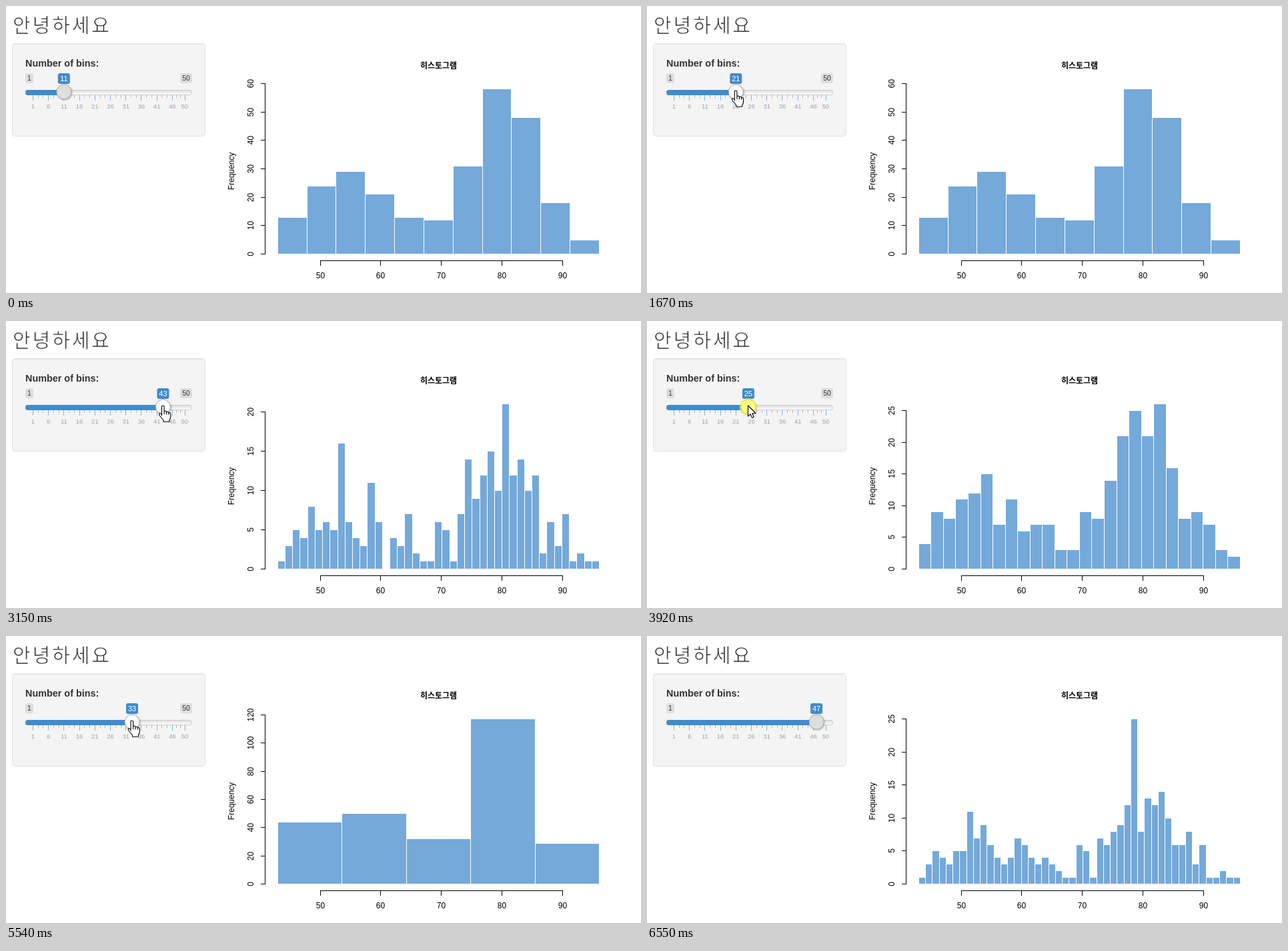
Animation of 952 by 431 pixels, one loop 7.33 s. Source, as an HTML page:

```html
<!DOCTYPE html>
<html lang="ko">
<meta charset="utf-8">
<title>Histogram slider</title>
<style>
  html, body { margin: 0; width: 100%; height: 100%; overflow: hidden; background: #fff; }
  svg { display: block; font-family: "Liberation Sans", Arial, sans-serif; }
  .ko { font-family: "Noto Sans CJK KR", "Noto Sans CJK", sans-serif; }
  .mid { text-anchor: middle; }
  .crisp { shape-rendering: crispEdges; }
</style>
<svg width="952" height="431" viewBox="0 0 952 431">
  <defs>
    <linearGradient id="groove" x2="0" y2="1">
      <stop stop-color="#dcdcdc"/><stop offset="1" stop-color="#fff"/>
    </linearGradient>
    <filter id="soft" x="-50%" y="-50%" width="200%" height="200%">
      <feDropShadow dx="1" dy="1" stdDeviation="1.2" flood-opacity=".3"/>
    </filter>
  </defs>
  <text class="ko" x="10" y="40" font-size="29" font-weight="300" letter-spacing=".1em" fill="#333" stroke="#fff" stroke-width=".7">안녕하세요</text>
  <rect x="9.5" y="56.5" width="289" height="139" rx="4" fill="#f4f4f4" stroke="#e1e1e1"/>
  <path d="M12 57.5H296" stroke="#e9e9e9"/>
  <text x="29" y="91" font-size="14.4" font-weight="bold" fill="#333">Number of bins:</text>
  <rect x="29.5" y="126.5" width="249" height="7" rx="3.5" fill="url(#groove)" stroke="#ccc"/>
  <g id="scale"></g>
  <g id="slider"></g>
  <text class="ko mid" x="648.5" y="94" font-size="12" font-weight="bold">히스토그램</text>
  <text class="mid" transform="translate(342 248) rotate(-90)" font-size="12">Frequency</text>
  <g id="plot"></g>
  <g id="pointer"></g>
</svg>
<script>
const TICK = 77.2, LOOP = 7330, REDRAW_DELAY = 3, FIRST = 43, SPAN = 53;

// How often each value from FIRST on was observed; every chart is binned from this
const counts = [1,0,3,5,4,3,5,5,6,5,7,9,6,4,3,4,7,6,0,4,3,4,3,2,1,1,2,
                4,5,1,7,6,8,9,12,15,10,8,13,12,14,10,6,6,2,6,3,6,1,1,2,1,0,1];

// Each drag: first tick, last tick, value reached
const drags = [[12, 20, 21], [21, 29, 32], [34, 38, 43], [43, 47, 26],
               [49, 57, 16], [58, 64, 5], [66, 72, 33], [75, 79, 47]];

const $ = id => document.getElementById(id);
const mix = (a, b, p) => a + (b - a) * p;
const text = (x, y, s, size, fill = "#000", more = "") =>
  `<text class="mid" x="${x}" y="${y}" font-size="${size}" fill="${fill}" ${more}>${s}</text>`;
const line = (d, color = "#000") => `<path class="crisp" d="${d}" fill="none" stroke="${color}"/>`;
const tag = (x, y, w, h, fill) => `<rect x="${x}" y="${y}" width="${w}" height="${h}" rx="3" fill="${fill}"/>`;

const sliderX = v => 40.4 + 4.645 * (v - 1);
const plotX = v => Math.round(406.84 + 9.096 * (v - FIRST)) + .5;

function stateAt(k) {
  const state = { value: 11, bins: 11, down: false, left: false };
  for (const [from, to, target] of drags) {
    if (k < from) break;
    state.down = k < to;
    state.left = state.down && target < 20 && target < state.value;
    state.value = mix(state.value, target, Math.min(1, (k - from) / (to - from)) ** 1.6);
    if (k >= to + REDRAW_DELAY) state.bins = target;
    else if (k >= to) break;
  }
  // The chart shows the newest value that has settled
  for (const [, to, target] of drags) if (k >= to + REDRAW_DELAY) state.bins = target;
  return state;
}

function drawScale() {
  let out = "";
  for (let v = 1; v < 55; v += 5) {
    const stop = Math.min(v, 50), x = sliderX(stop), gap = (sliderX(Math.min(v + 5, 50)) - x) / 3;
    out += line(`M${Math.floor(x) + .5} 134V142`, "#84b4dc") + text(x, 154, stop, 9.5, "#9aa5a0");
    for (let j = 1; gap && j < 3; j++) out += line(`M${Math.floor(x + gap * j) + .5} 134V138`, "#b5b5b5");
  }
  $("scale").innerHTML = out;
}

function drawSlider(v, active) {
  const x = sliderX(v), w = v > 9 ? 18 : 12;
  let out = `<rect x="29" y="126" width="${x - 29}" height="8" rx="4" fill="#428bca"/>`;
  if (x - w / 2 > 41) out += tag(29, 101, 12, 15, "#dedede") + text(35, 112, 1, 10.5, "#333");
  if (x + w / 2 < 261) out += tag(261, 101, 18, 15, "#dedede") + text(270, 112, 50, 10.5, "#333");
  out += tag(x - w / 2, 101, w, 16, "#428bca") + text(x, 113, v, 11, "#fff");
  out += `<circle cx="${x}" cy="129" r="11" fill="${active ? "#fff" : "#dedede"}" stroke="#aaa" filter="url(#soft)"/>`;
  $("slider").innerHTML = out;
}

// Round step giving about five intervals
function niceStep(range) {
  const cell = range / 5, base = 10 ** Math.floor(Math.log10(cell));
  let unit = base;
  for (const [m, bias] of [[2, 1.5], [5, 2.75], [10, 1.5]])
    if (m * base - cell < bias * (cell - unit)) unit = m * base;
    else break;
  return unit;
}

function drawPlot(n) {
  const bins = Array(n).fill(0);
  counts.forEach((c, i) => bins[Math.max(0, Math.ceil(i * n / SPAN - 1e-9) - 1)] += c);
  const max = Math.max(...bins), step = niceStep(max * 1.08);
  const y = c => Math.round(372 - 247.6 * c / max) + .5;
  let out = "", top = 0;
  bins.forEach((c, i) => {
    const left = plotX(FIRST + SPAN * i / n), right = plotX(FIRST + SPAN * (i + 1) / n);
    out += `<rect class="crisp" x="${left}" y="${y(c)}" width="${right - left}" height="${y(0) - y(c)}" fill="#74a9da" stroke="#fff"/>`;
  });
  for (let c = 0; c <= max * 1.04; c += step) {
    top = y(c);
    out += line(`M382 ${top}H389`) + text(0, 0, c, 12, "#000", `transform="translate(371 ${top}) rotate(-90)"`);
  }
  out += line(`M388.5 373V${top}`) + line(`M${plotX(50)} 382.5H${plotX(90)}`);
  for (let v = 50; v <= 90; v += 10) out += line(`M${plotX(v)} 382V390`) + text(plotX(v), 409, v, 12);
  $("plot").innerHTML = out;
}

const ARROW = "M0 0V16.2L3.7 12.7 6.1 18.4 8.7 17.2 6.4 11.7H11.5Z";
const HAND = "M-2 15V1.8A1.8 1.8 0 0 1 1.6 1.8V8.5Q4.4 7.4 5 9.4 7.8 8.4 8.4 10.6 11.2 10 11.3 12.6V16.5Q11.3 19.5 9.3 22V24.3H.6V22L-4.8 15.5Q-6.6 12.4-5.2 11.6-3.8 11.2-2 14Z" +
             "M1.6 8.5V13M5 9.4V13.4M8.4 10.6V13.8";

// The pointer comes in from the lower right, rides the handle, then leaves
function drawPointer(k, { value, down, left }) {
  let x = sliderX(value), y = 127, shape = left ? ARROW : HAND;
  if (k < 11) {
    const p = (k - 1) / 9;
    [x, y, shape] = [mix(797, 95, p), mix(415, 117, p), ARROW];
  } else if (k > 80) {
    const p = (k - 80) / 4;
    [x, y, shape] = [mix(x, 420, p), mix(y, 370, p), ARROW];
  }
  $("pointer").innerHTML = k < 1 || k > 84 ? "" :
    (down ? `<circle cx="${x}" cy="${y + 2}" r="13" fill="#ff0" opacity=".5"/>` : "") +
    `<path transform="translate(${x} ${y})" d="${shape}" fill="#fff" stroke="#000" stroke-width="1.1" stroke-linejoin="round"/>`;
}

let last = -1;
const start = performance.now();
function frame() {
  const k = Math.floor(((performance.now() - start) % LOOP + 32) / TICK);
  if (k != last) {
    last = k;
    const state = stateAt(k);
    drawSlider(Math.round(state.value), k > 10 && k < 82);
    drawPlot(state.bins);
    drawPointer(k, state);
  }
  requestAnimationFrame(frame);
}

drawScale();
frame();
</script>
</html>
```
